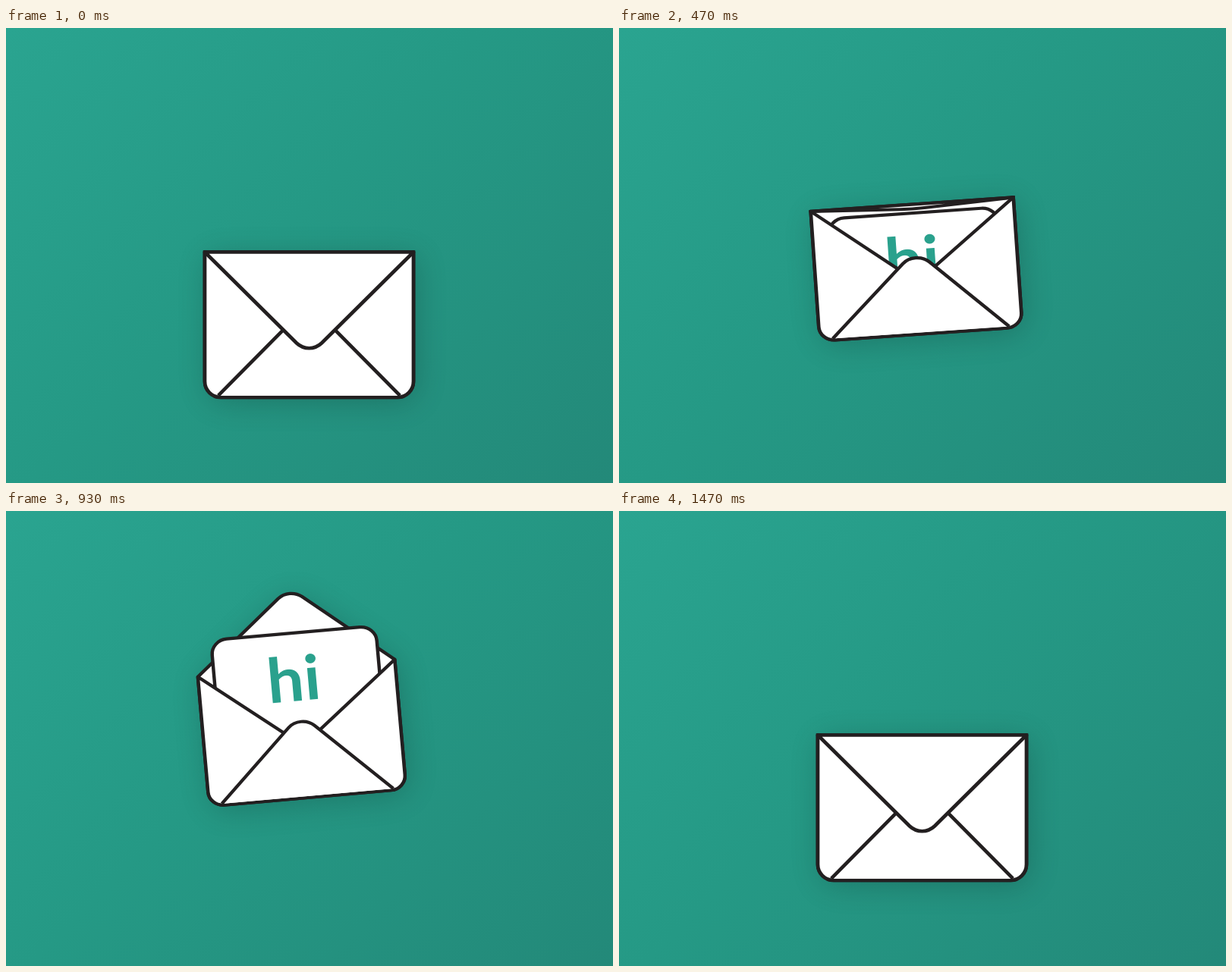
An HTML page with a canvas for the animation above (1830 ms loop, 800x600 px).

```html
<!DOCTYPE html>
<html lang="en">
<head>
<meta charset="utf-8">
<title>Envelope</title>
<style>
  html, body { margin: 0; width: 100%; height: 100%; overflow: hidden; }
  body { background: linear-gradient(135deg, #2aa490, #259985 45%, #238979); }
  canvas { display: block; width: 800px; height: 600px; }
</style>
</head>
<body>
<canvas id="stage" width="800" height="600"></canvas>
<script>
const ctx = document.getElementById('stage').getContext('2d');
const LOOP = 1830, HALF = 137.5, HEIGHT = 191.5, CORNER = 21;
const INK = '#231f20', TEAL = '#2aa18d';

// Eased 0..1 progress between two times
const linear = p => p;
const cubicOut = p => 1 - (1 - p) ** 3;
const inOut = power => p =>
  p < .5 ? (2 * p) ** power / 2 : 1 - (2 - 2 * p) ** power / 2;
const quad = inOut(2), cubic = inOut(3);
const ramp = (t, from, to, ease = quad) =>
  ease(Math.min(1, Math.max(0, (t - from) / (to - from))));

function pose(t) {
  const leap = ramp(t, 330, 680, cubicOut);
  const fall = ramp(t, 1014, 1272, cubic);
  return {
    x: 399.5 - 1.8 * leap + 1.8 * fall,
    y: 487 - 106 * leap - 3 * ramp(t, 680, 900) + 109 * fall,
    angle: -5.06 * leap + 6.65 * ramp(t, 981, 1225) - 1.59 * ramp(t, 1225, 1450),
    scaleX: 1 - .053 * ramp(t, 330, 610) + .053 * ramp(t, 1040, 1270),
    scaleY: 1 - .105 * ramp(t, 30, 419) + .105 * ramp(t, 1170, 1470),
    flap: 1 - 1.87 * ramp(t, 330, 610) + 1.87 * ramp(t, 930, 1385),
    lift: 65.5 * (ramp(t, 450, 740) - ramp(t, 927, 1170)),
    tickHead: ramp(t, 590, 690, linear),
    tickTail: ramp(t, 650, 786, linear)
  };
}

function paint(path, join = 'round') {
  ctx.lineJoin = join;
  ctx.fill(path);
  ctx.stroke(path);
}

// Flap edge from the top left to the top right corner
function flapEdge(path, flap) {
  const at = depth => -HEIGHT + depth * flap;
  path.moveTo(-HALF, -HEIGHT);
  path.lineTo(-16.5, at(120));
  path.bezierCurveTo(-7, at(129), 7, at(129), 16.5, at(120));
  path.lineTo(HALF, -HEIGHT);
}

// Sides and bottom, continuing from the top right corner
function closeBody(path) {
  path.arcTo(HALF, 0, 0, 0, CORNER);
  path.arcTo(-HALF, 0, -HALF, -HEIGHT, CORNER);
  path.closePath();
}

function drawBack(flap) {
  const path = new Path2D();
  const open = flap < -.04;
  flapEdge(path, open ? flap : 0);
  closeBody(path);
  ctx.save();
  ctx.shadowColor = 'rgba(0, 0, 0, .2)';
  ctx.shadowBlur = 40;
  ctx.shadowOffsetX = 4;
  ctx.shadowOffsetY = 6;
  ctx.fill(path);
  ctx.restore();
  paint(path, open ? 'round' : 'miter');
}

function drawLetter(lift) {
  const sheet = new Path2D();
  sheet.roundRect(-115, -178 - lift, 230, 165, 22);
  paint(sheet);
  ctx.save();
  ctx.fillStyle = TEAL;
  ctx.font = '700 91px Lato, sans-serif';
  ctx.fillText('hi', -42.3, -78 - lift);
  ctx.restore();
}

function drawFront() {
  const sides = new Path2D();
  sides.moveTo(-HALF, -HEIGHT);
  sides.lineTo(0, -77);
  sides.lineTo(HALF, -HEIGHT);
  closeBody(sides);
  paint(sides);

  const pocket = new Path2D();
  pocket.moveTo(-119.7, -2.3);
  pocket.lineTo(-18, -105.2);
  pocket.bezierCurveTo(-8.5, -114.9, 8.5, -114.9, 18, -105.2);
  pocket.lineTo(119.7, -2.3);
  paint(pocket);
}

function drawTicks(head, tail) {
  if (head <= tail) return;
  ctx.beginPath();
  for (const side of [-1, 1]) {
    for (const p of [tail, head]) {
      const x = -5 + side * (95 + 10 * p), y = -252 - 23 * p;
      p === tail ? ctx.moveTo(x, y) : ctx.lineTo(x, y);
    }
  }
  ctx.strokeStyle = '#111';
  ctx.stroke();
}

function draw(t) {
  const p = pose(t);
  ctx.clearRect(0, 0, 800, 600);
  ctx.save();
  ctx.translate(p.x, p.y);
  ctx.rotate(p.angle * Math.PI / 180);
  ctx.scale(p.scaleX, p.scaleY);
  ctx.fillStyle = '#fff';
  ctx.strokeStyle = INK;
  ctx.lineWidth = 4.7;

  drawBack(p.flap);
  drawLetter(p.lift);
  drawFront();
  if (p.flap > .02) {
    const path = new Path2D();
    flapEdge(path, p.flap);
    path.closePath();
    paint(path);
  }
  drawTicks(p.tickHead, p.tickTail);
  ctx.restore();
}

const start = performance.now();
function frame() {
  draw((performance.now() - start) % LOOP);
  requestAnimationFrame(frame);
}
frame();
</script>
</body>
</html>
```
